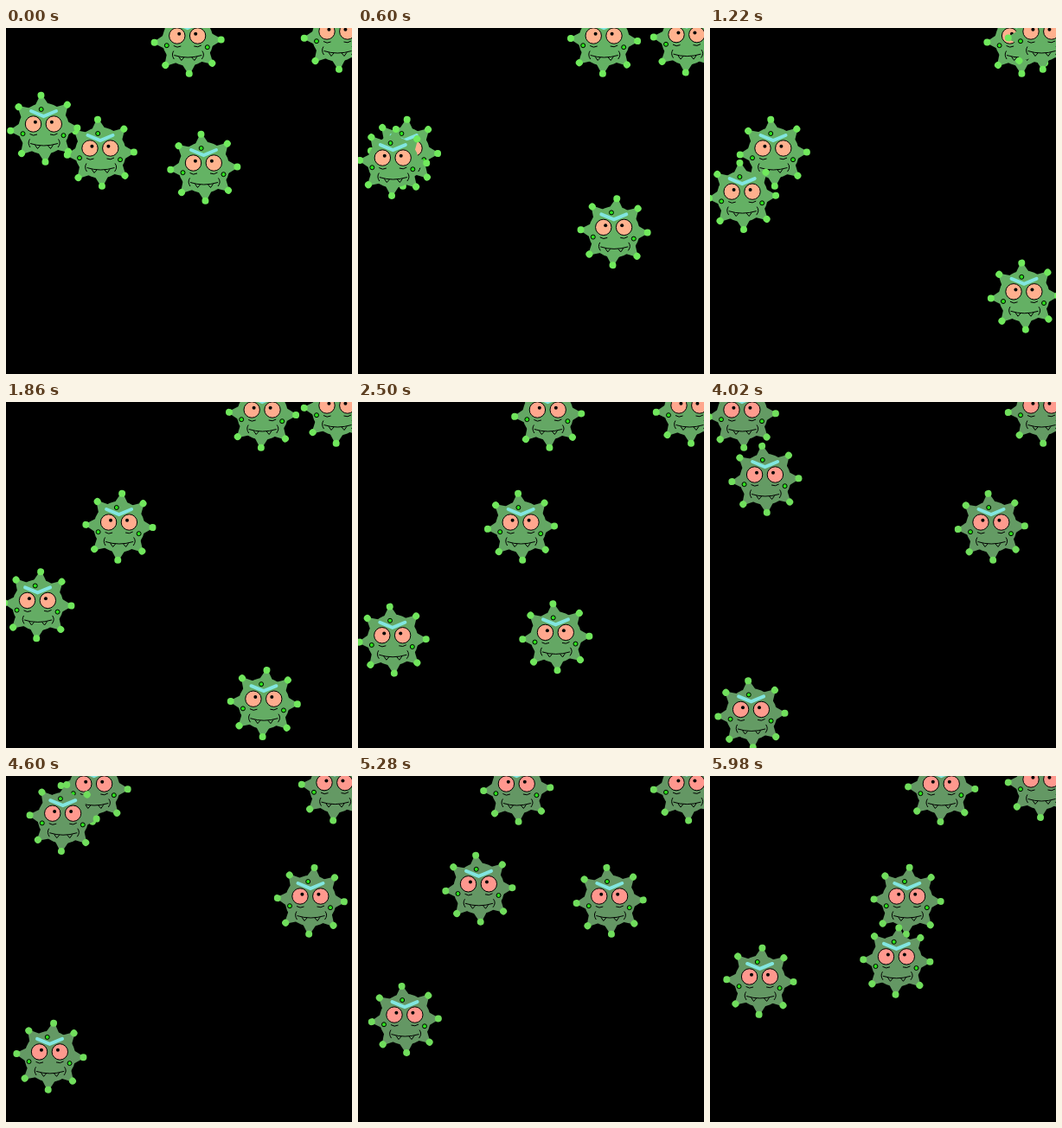
Write an HTML page with a canvas that moves like this. It is 400 px wide and 400 px high and loops after 6000 ms.

```html
<!DOCTYPE html>
<html lang="en">
<head>
<meta charset="utf-8">
<title>Bouncing germs</title>
<style>
  html, body { margin: 0; width: 100%; height: 100%; overflow: hidden; background: #000; }
  canvas { display: block; width: 400px; height: 400px; }
</style>
</head>
<body>
<canvas id="stage" width="400" height="400"></canvas>
<script>
const ctx = document.getElementById('stage').getContext('2d');
const LOOP = 6000, TICK = 20;

// Limits for the left eye, which is each germ's reference point.
const MIN_X = 23.3, MAX_X = 351.9, MIN_Y = 30, MAX_Y = 360.2;

// Start position and speed per step, listed from back to front.
const germs = [
  { x: 197.8, y: 9, vx: 2.4, vy: 0 },
  { x: 97, y: 139, vx: -1.8, vy: 0 },
  { x: 371, y: 4, vx: -3, vy: 3.6 },
  { x: 31.5, y: 111, vx: -0.102, vy: 1.26 },
  { x: 216.5, y: 156, vx: 2.17, vy: 2.4 }
];

// A germ outside the limits flips every step, so it trembles in place.
function positionAt(germ, steps) {
  let { x, y, vx, vy } = germ;
  for (let i = 0; i < steps; i++) {
    x += vx;
    y += vy;
    if (x < MIN_X || x > MAX_X) vx = -vx;
    if (y < MIN_Y || y > MAX_Y) vy = -vy;
  }
  return [x, y];
}

function disc(x, y, r, fill, outlined) {
  ctx.beginPath();
  ctx.arc(x, y, r, 0, Math.PI * 2);
  ctx.fillStyle = fill;
  ctx.fill();
  if (outlined) ctx.stroke();
}

function drawBody(turn, skin, bulb) {
  ctx.save();
  ctx.translate(12.3, 5.3);
  disc(0, 0, 29.5, skin);
  for (let i = 0; i < 8; i++) {
    ctx.rotate(turn);
    ctx.beginPath();
    ctx.moveTo(-8, -27);
    ctx.lineTo(-1, -39);
    ctx.lineTo(1, -39);
    ctx.lineTo(8, -27);
    ctx.fillStyle = skin;
    ctx.fill();
    disc(0, -38.6, 4, bulb);
  }
  ctx.restore();
}

const face = new Path2D(
  'M-4 11.5Q0 14.5 4.5 12M19.5 12Q24 14 28 11' +
  'M-4 17.5Q-7 22 -3.5 27M29 17.5Q32.5 22 28.5 27' +
  'M-3.5 22.5Q12 27.5 28.5 22.5' +
  'M2 24.3L5 28.5L8 25M17 25L20 28.5L23 24.3');
const brow = new Path2D('M-2.5 -15L12 -9L26.5 -15');

function drawFace(eye) {
  ctx.lineWidth = 1;
  ctx.strokeStyle = '#000';
  for (const [x, y] of [[9.2, -17], [-12, 11.2], [35, 13.2]]) disc(x, y, 2.5, '#2be01c', true);
  for (const [x, look] of [[0, 2.4], [23.8, -2.4]]) {
    disc(x, 0, 9.2, eye, true);
    disc(x + look, -2.2, 2, '#000');
  }
  ctx.stroke(face);
  ctx.lineWidth = 4;
  ctx.lineCap = 'round';
  ctx.strokeStyle = '#82e6e0';
  ctx.stroke(brow);
  ctx.lineCap = 'butt';
}

function draw(time) {
  const tick = Math.floor((time % LOOP) / TICK);
  const steps = tick ? tick + 1 : 0;
  const turn = Math.PI / 4 - 0.0147 * Math.cos(0.1 * steps - 0.75);
  const tone = Math.round(165 + 14 * Math.cos(0.0115 * steps));
  const skin = `rgb(100,${tone},100)`;
  const eye = `rgb(255,${tone},142)`;
  const bulb = `rgb(112,${tone / 2 + 145},92)`;

  ctx.fillStyle = '#000';
  ctx.fillRect(0, 0, 400, 400);
  for (const germ of germs) {
    ctx.save();
    ctx.translate(...positionAt(germ, steps));
    drawBody(turn, skin, bulb);
    drawFace(eye);
    ctx.restore();
  }
}

const start = performance.now();
function loop() {
  draw(performance.now() - start);
  requestAnimationFrame(loop);
}
loop();
</script>
</body>
</html>
```
